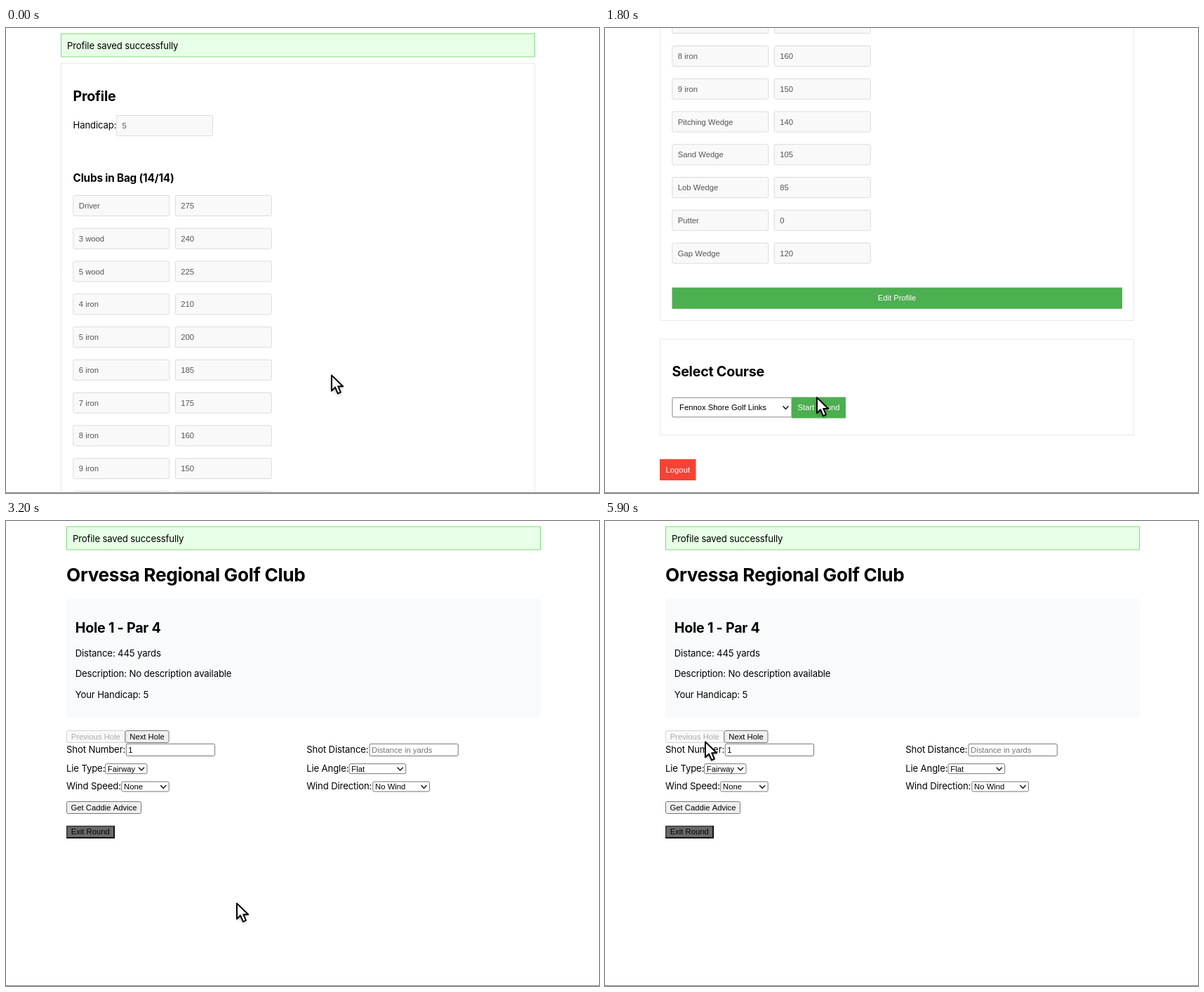
Recreate the animation shown at these times as an HTML page with a canvas. Size 845 by 662 pixels, loop 6280 ms.

```html
<!DOCTYPE html>
<html lang="en">
<head>
<meta charset="utf-8">
<title>Golf round</title>
<style>
html, body { margin: 0; width: 100%; height: 100%; overflow: hidden; background: #fff; }
canvas { display: block; }
</style>
</head>
<body>
<canvas id="stage" width="845" height="662"></canvas>
<script>
const ctx = document.getElementById('stage').getContext('2d');
const LOOP = 6280, STEP = 100;
const UI = 'Inter, "Open Sans", sans-serif';
const FORM = '"Liberation Sans", Arial, sans-serif';
const GREEN = '#4caf50', LINE = '#767676';
const LINKS = 'Fennox Shore Golf Links', CLUB = 'Orvessa Regional Golf Club';
const CLUBS = [
  ['Driver', 275], ['3 wood', 240], ['5 wood', 225], ['4 iron', 210], ['5 iron', 200],
  ['6 iron', 185], ['7 iron', 175], ['8 iron', 160], ['9 iron', 150], ['Pitching Wedge', 140],
  ['Sand Wedge', 105], ['Lob Wedge', 85], ['Putter', 0], ['Gap Wedge', 120]
];
const HOLES = [[4, 445], [5, 575], [4, 350]];
const SCROLL = 540.4;

// Pointer path: time, x, y
const PATH = [
  [0, 463, 492], [100, 465, 477], [300, 465, 477], [400, 466, 472], [1500, 466, 472],
  [1900, 246, 541], [2200, 250, 563], [2300, 250, 563], [2900, 331, 542], [3000, 332, 544],
  [3100, 332, 544], [3200, 328, 542], [3400, 328, 541], [3500, 328, 541], [3800, 286, 412],
  [4200, 172, 310], [4400, 172, 310], [4600, 172, 314], [4800, 165, 305], [4900, 165, 305],
  [5000, 172, 312], [5100, 172, 312], [5300, 142, 312], [LOOP, 142, 312]
];

function pointerAt(t) {
  const i = PATH.findIndex(p => p[0] > t);
  const [t0, x0, y0] = PATH[i - 1], [t1, x1, y1] = PATH[i];
  const k = (t - t0) / (t1 - t0);
  return { x: x0 + (x1 - x0) * k, y: y0 + (y1 - y0) * k };
}

function text(str, x, y, font, color = '#000', spacing = 0, align = 'left') {
  ctx.font = font;
  ctx.letterSpacing = spacing + 'px';
  ctx.fillStyle = color;
  ctx.textAlign = align;
  ctx.fillText(str, x, y);
}
const body = (str, x, mid) => text(str, x, mid + 4.8, '13.2px ' + UI, '#000', -0.16);
const form = (str, x, mid, color, align) => text(str, x, mid + 4, '11.27px ' + FORM, color, 0, align);
const head = (str, x, base, size) => text(str, x, base, `bold ${size * 0.97}px ${UI}`, '#000', -size * 0.012);

function box(x, y, w, h, fill, stroke, r = 0, line = 1) {
  ctx.beginPath();
  const d = stroke ? line / 2 : 0;
  ctx.roundRect(x + d, y + d, w - 2 * d, h - 2 * d, r);
  if (fill) { ctx.fillStyle = fill; ctx.fill(); }
  if (stroke) { ctx.strokeStyle = stroke; ctx.lineWidth = line; ctx.stroke(); }
}

function poly(points, color, width) {
  ctx.beginPath();
  points.forEach(([x, y]) => ctx.lineTo(x, y));
  ctx.strokeStyle = color;
  ctx.lineWidth = width;
  ctx.stroke();
}
const chevron = (x, y) => poly([[x - 4, y - 2], [x, y + 2.2], [x + 4, y - 2]], '#111', 1.5);

function alertBar(x) {
  box(x, 7.5, 676, 34, '#e6ffe6', '#7ddc7d');
  body('Profile saved successfully', x + 9, 24.8);
}

function field(str, x, y) {
  box(x, y, 138, 30, '#f9f9f9', '#dcdcdc', 2);
  form(str, x + 8.5, y + 15, '#555');
}

function profilePage(scroll, course, focused) {
  ctx.save();
  ctx.translate(0, -scroll);
  alertBar(78);
  box(78, 50, 676, 907.4, null, '#e8e8e8');
  head('Profile', 95.5, 103.5, 20.28);
  body('Handicap:', 95.5, 138.6);
  field('5', 157, 124);
  head('Clubs in Bag (14/14)', 95.5, 219.2, 15.8);
  CLUBS.forEach(([name, yards], i) => {
    const y = 238 + i * 46.77;
    field(name, 95.3, y);
    field(yards, 240.8, y);
  });
  box(95.5, 910, 641.5, 30.2, GREEN);
  form('Edit Profile', 416, 924.8, '#fff', 'center');

  box(78, 983, 676, 137.4, null, '#e8e8e8');
  head('Select Course', 95.5, 1036.2, 20.28);
  box(95.5, 1066.2, 171, 28.6, '#fff', focused ? '#0f62bd' : '#858585', 1, focused ? 2 : 1);
  form(course, 106, 1080.4, '#000');
  chevron(257.5, 1080.6);
  box(266, 1065.8, 77, 30, GREEN);
  form('Start Round', 304.5, 1080.4, '#fff', 'center');
  box(78, 1154.2, 51.5, 30.2, '#f44336');
  form('Logout', 103.8, 1169.4, '#fff', 'center');
  ctx.restore();
}

function menu(lit) {
  ctx.save();
  ctx.shadowColor = 'rgba(0,0,0,.3)';
  ctx.shadowBlur = 9;
  ctx.shadowOffsetY = 3;
  box(87.5, 502.5, 181, 80, '#ececec', null, 6);
  ctx.restore();
  box(87.5, 502.5, 181, 80, null, '#bdbdbd', 6);
  if (lit) box(93, 554.5, 170, 23, '#0663e2', null, 4);
  const item = (str, y, color) => text(str, 113, y, '500 10.8px ' + UI, color, 0.05);
  item('Select a course...', 521.8, '#111');
  item(LINKS, 545, '#111');
  item(CLUB, 568.2, lit ? '#fff' : '#111');
  poly([[99.5, 543.8], [102.5, 547], [108, 539.2]], '#111', 1.8);
}

function button(str, x, y, w, at, off) {
  const hover = at && at.x > x && at.x < x + w && at.y > y && at.y < y + 18;
  box(x, y, w, 18, off ? '#f9f9f9' : hover ? '#e3e3e3' : '#efefef', off ? '#d2d2d2' : LINE, 2);
  form(str, x + w / 2, y + 8.6, off ? '#aaa' : '#000', 'center');
}

function input(label, str, x, left, color) {
  body(label, x, 325);
  box(left, 316.8, 127.3, 18.2, '#fff', LINE, 2);
  form(str, left + 3.5, 325.8, color);
}

function select(label, str, x, mid, left, w) {
  body(label, x, mid - 0.4);
  box(left, mid - 7.2, w, 15, '#fff', LINE, 2);
  form(str, left + 3.8, mid + 0.4, '#000');
  chevron(left + w - 8.5, mid + 0.4);
}

function roundPage(hole, at) {
  const [par, yards] = HOLES[hole - 1];
  alertBar(86);
  head(CLUB, 86, 85.6, 27.04);
  box(86, 110.5, 676, 169.5, '#f8fafc', null, 4);
  head(`Hole ${hole} - Par ${par}`, 98.7, 158.6, 20.28);
  body(`Distance: ${yards} yards`, 98.7, 188);
  body('Description: No description available', 98.7, 217.4);
  body('Your Handicap: 5', 98.7, 247);

  button('Previous Hole', 86, 298, 83.5, at, hole === 1);
  button('Next Hole', 169.5, 298, 63, at);
  input('Shot Number:', '1', 86, 170.8, '#000');
  input('Shot Distance:', 'Distance in yards', 428.2, 517.5, '#757575');
  select('Lie Type:', 'Fairway', 86, 352.4, 141, 60.5);
  select('Lie Angle:', 'Flat', 428.2, 352.4, 488.5, 81.7);
  select('Wind Speed:', 'None', 86, 377.8, 164.2, 68.5);
  select('Wind Direction:', 'No Wind', 428.2, 377.8, 522.3, 81.7);
  button('Get Caddie Advice', 86, 399, 107);
  box(86, 433.8, 69, 18, '#696969', '#333', 0, 1.5);
  poly([[86, 451], [154.2, 451], [154.2, 434]], '#000', 1.6);
  form('Exit Round', 120.2, 442.4, '#000', 'center');
}

const ARROW = new Path2D('M1 2.4V24.4L6.1 19.6L9.9 28.4L13.9 26.6L10.2 18.2H17.2Z');
const HAND = new Path2D('M4.6 14.5L.2 3.2C-.8 .4 3-.8 4 1.6L7.2 9.2C8 7.8 10.4 8 11 9.6' +
  'C12 8.2 14.2 8.6 14.6 10.4C16.4 9.4 18 10.6 18 13C18.2 17 17.6 19 16.4 21.6V26H5.4V23.6' +
  'C2.2 20.6-.6 17.4-4 14.6C-5.4 13-3.4 11.4-1.4 12.4L2.6 15.4');

function pointer({ x, y }, hand) {
  ctx.save();
  ctx.translate(x, y);
  ctx.lineJoin = 'round';
  ctx.save();
  ctx.shadowColor = 'rgba(0,0,0,.4)';
  ctx.shadowBlur = 4;
  ctx.shadowOffsetY = 2;
  ctx.fillStyle = '#fff';
  ctx.fill(hand ? HAND : ARROW);
  ctx.restore();
  ctx.strokeStyle = '#000';
  ctx.lineWidth = hand ? 1.7 : 2;
  ctx.stroke(hand ? HAND : ARROW);
  if (hand) for (const lx of [7, 10.4, 13.8]) poly([[lx, 15.5], [lx, 22]], '#000', 1.4);
  ctx.restore();
}

function draw(now) {
  const t = Math.floor(now % LOOP / STEP) * STEP;
  const at = pointerAt(t);
  ctx.fillStyle = '#fff';
  ctx.fillRect(0, 0, 845, 662);
  if (t < 3100) {
    const k = Math.min(1, Math.max(0, (t - 500) / 500));
    const picked = t >= 2500;
    profilePage(SCROLL * k * k * (3 - 2 * k), picked ? CLUB : LINKS, picked);
    if (t >= 2000 && !picked) menu(t >= 2100);
  } else {
    roundPage(t < 4400 || t >= 5800 ? 1 : t >= 5100 && t < 5500 ? 3 : 2, at);
  }
  pointer(at, t >= 2600 && t < 3200 && at.x > 266);
  ctx.fillStyle = '#858585';
  ctx.fillRect(0, 661, 845, 1);
}

const start = performance.now();
function tick() {
  draw(performance.now() - start);
  requestAnimationFrame(tick);
}
tick();
</script>
</body>
</html>
```
